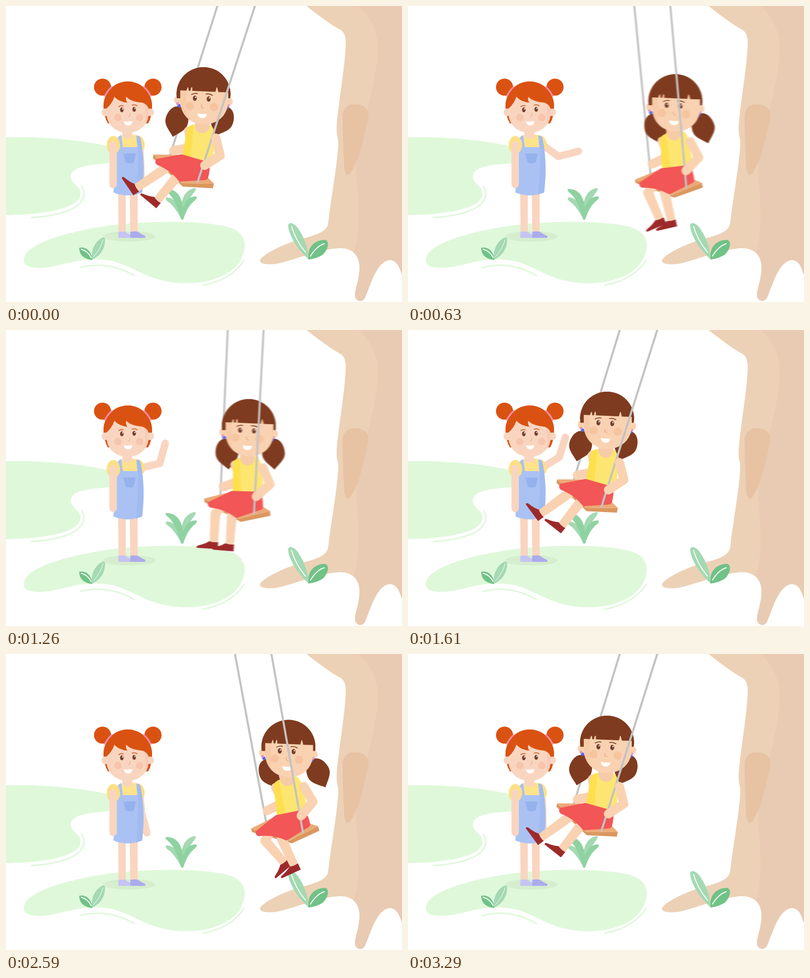
These frames come from a looping animation (800x600 px, 3.36 s). An HTML page:

```html
<!DOCTYPE html>
<html lang="en">
<head>
<meta charset="utf-8">
<title>Swing</title>
<style>
html, body { margin: 0; width: 100%; height: 100%; overflow: hidden; background: #fff; }
svg { display: block; width: 800px; height: 600px; }
.line { fill: none; stroke-linecap: round; stroke-linejoin: round; }
.grass { fill: #dff8da; }
.edge { stroke: #dff8da; stroke-width: 3; }
.vein { stroke: #fff; stroke-width: 1.9; }
.leaf { fill: #70c287; }
.pale { fill: #a4d9b2; }
.blade { fill: #8fd2a1; }
.skin { fill: #f9d5c0; }
.limb { stroke: #f9d5c0; stroke-width: 15; }
.tan { fill: #f9d2b2; }
.tanlimb { stroke: #f9d2b2; stroke-width: 18.5; }
.red { fill: #da5212; }
.brown { fill: #7f3b1f; }
.eye { fill: #753f30; }
.brow { stroke: #7f3b1f; stroke-width: 1.7; }
.rope { stroke: #c3c3c3; stroke-width: 4.2; }
</style>
</head>
<body>
<svg viewBox="0 0 800 600">
<defs>
  <filter id="blur" filterUnits="userSpaceOnUse" x="0" y="0" width="800" height="600" color-interpolation-filters="sRGB"><feGaussianBlur stdDeviation="0"/></filter>
  <filter id="soft" filterUnits="userSpaceOnUse" x="0" y="0" width="800" height="600" color-interpolation-filters="sRGB"><feGaussianBlur stdDeviation="0"/></filter>
  <path id="trunk" d="M607,0C630,18 655,37 675,48C686,54 687,68 686,85C684,130 668,220 668,250C668,270 672,262 671,285C668,330 655,400 651,440C648,460 620,466 590,474C560,483 515,505 513,516C513,524 530,525 550,522C590,512 640,492 672,491C700,490 712,505 714,525C716,550 704,575 705,588C708,600 720,601 725,592C735,570 748,517 775,515C790,515 795,530 800,545V0Z"/>
  <clipPath id="bark"><use href="#trunk"/></clipPath>
  <path id="tail" class="brown" d="M0,-1C17,-1 23,17 23,29C23,43 10,51 0,62C-10,51 -23,43 -23,29C-23,17 -17,-1 0,-1Z"/>
  <g id="leg">
    <path class="tan" d="M-10,0A10,10 0 0 1 10,0L8.5,62H-8Z"/>
    <path fill="#9d2a2b" d="M-9,57Q0,60 9,58V72H-33Q-36,69 -31,67Q-17,63 -9,57Z"/>
  </g>
</defs>

<!-- ground -->
<path class="grass" d="M0,266C70,264 160,272 210,285Q235,300 222,318C180,321 133,322 131,345C131,363 154,364 150,385C142,415 60,423 0,424Z"/>
<path class="grass" d="M36,513C40,480 130,455 225,443C320,433 420,437 455,450C485,462 485,485 480,500C470,540 420,562 365,562C290,562 265,530 215,517C150,505 110,530 70,531C45,531 34,525 36,513Z"/>
<g class="line edge">
  <path d="M153,366C164,385 153,405 122,416Q95,426 51,429"/>
  <path d="M151,530Q205,516 259,546"/>
  <path d="M398,566Q455,555 481,516"/>
</g>

<!-- tree -->
<use href="#trunk" fill="#ecd1b6"/>
<g clip-path="url(#bark)">
  <path fill="#e8cbb2" d="M712,0C740,25 752,55 751,90C750,130 738,180 730,210C712,270 707,300 708,340C712,400 717,460 702,500V600H800V0Z"/>
</g>
<path fill="#e7c3a3" d="M706,199C690,198 680,208 680,225C680,260 682,300 683,325C684,341 690,346 695,340C715,310 722,270 732,225C735,208 722,200 706,199Z"/>

<!-- plants -->
<path class="pale" d="M382,369C358,372 350,400 354,433C365,405 369,390 380,378Q385,371 382,369Z"/>
<path class="pale" d="M324,388C341,388 352,405 355,433C344,413 336,402 325,395Q321,390 324,388Z"/>
<path class="blade" d="M323,371C352,370 360,398 358,433H354C346,405 339,388 325,377Q321,373 323,371Z"/>
<path class="blade" d="M384,386C363,386 356,405 354,433H358C365,411 373,400 384,392Q387,387 384,386Z"/>
<path class="leaf" d="M173,515C155,512 148,503 148,490C161,487 174,497 174,515Z"/>
<path class="pale" d="M174,514C170,495 182,472 200,468C202,488 193,505 174,514Z"/>
<path class="pale" d="M611,513C590,495 571,465 570,445C571,437 580,439 588,448C600,465 610,485 611,513Z"/>
<path class="leaf" d="M611,514C608,490 622,474 645,474C655,478 650,495 640,504Q628,512 611,514Z"/>
<g class="line vein">
  <path d="M152,493Q166,497 172,510"/>
  <path d="M177,508Q191,493 196,474" stroke-width="1"/>
  <path d="M577,447Q585,475 605,499"/>
  <path d="M615,507Q628,486 643,482"/>
</g>

<!-- standing girl -->
<ellipse cx="249" cy="467" rx="53" ry="10.5" fill="#d6edce"/>
<path class="skin" d="M226.5,375H242V460H227.5ZM250,375H266V460H251Z"/>
<path fill="#c4c4f3" d="M227,458Q235,456 242,458Q247,463 257,466Q259,470 256,470H227Z"/>
<path fill="#ababec" d="M251,458Q259,456 266,457.5Q272,462 281,466Q283,470 280,470H251Z"/>
<path id="wave" class="line limb"/>
<ellipse cx="271" cy="277" rx="8.5" ry="15" fill="#fedf85" transform="rotate(-18 271 277)"/>
<path fill="#ffe28a" d="M228,264Q246,256 266,263L268,290H230Z"/>
<path class="skin" d="M235,253H255V261Q255,269 245,269Q235,269 235,261Z"/>
<path fill="#aac2f3" d="M225,268Q229,262 233,262L236,286H265L263,262Q270,263 272,270Q282,320 275,378Q246,390 217,378L222,310Z"/>
<path fill="#a1bbf0" d="M266,262.5Q271,264 272,270Q282,320 275,378L263,382Q267,330 267,290Z"/>
<path fill="#95b2ed" d="M237,299H262L259,314Q258,319 253,319H246Q242,319 241,315Z"/>
<ellipse cx="217" cy="282" rx="13.5" ry="18.5" fill="#fedf85"/>
<path class="line limb" d="M216.5,281V361.5"/>
<g>
  <circle class="red" cx="195" cy="164.5" r="17.3"/>
  <circle class="red" cx="297" cy="164.5" r="17.3"/>
  <path class="red" d="M197,203A49,50 0 0 1 295,203Q295,226 287,238H206Q198,226 197,203Z"/>
  <circle class="skin" cx="200.5" cy="215.5" r="7.7"/>
  <circle class="skin" cx="291.5" cy="215.5" r="7.7"/>
  <path class="skin" d="M203,195Q203,172 246,172Q288,172 288,195V217C288,240 270,257 246,257C221,257 203,240 203,217Z"/>
  <path fill="#f7cdb9" d="M281,195H288V217Q288,231 281,241Z"/>
  <path class="red" d="M197,208V203A49,50 0 0 1 295,203V208H288Q286,200 276,196Q252,194 243,184Q241,190 245,196Q228,194 219,184Q214,198 204,207Z"/>
  <path class="line" stroke="#f98ca6" stroke-width="3.4" d="M213,164.5Q205,172 200,182M279,164.5Q287,172 292,182"/>
  <g fill="#f6c5ae"><circle cx="226" cy="226" r="7.6"/><circle cx="270" cy="226" r="7.6"/></g>
  <ellipse class="eye" cx="234" cy="210.5" rx="3.6" ry="5"/>
  <ellipse class="eye" cx="259" cy="209.5" rx="3.6" ry="5"/>
  <g fill="#fff"><circle cx="235.5" cy="208.5" r="1.2"/><circle cx="260.5" cy="207.5" r="1.2"/></g>
  <path class="line" stroke="#c8521e" stroke-width="1.6" d="M228,204Q232,201 237,202.5M255,201Q261,199 265,202.5"/>
  <path class="line" stroke="#edb59b" stroke-width="1.4" d="M250,218Q252,224 247,224.5"/>
  <path fill="#fff" d="M238,233.5Q246,235.5 255,233Q255,242 247,242Q239,242 238,233.5Z"/>
</g>

<!-- swing -->
<g filter="url(#soft)"><g class="swing"><path class="line rope" d="M450,-73L331,304"/></g></g>
<g filter="url(#blur)"><g class="swing">
  <path fill="#db975f" d="M298,301L296.5,308L357,366L418,369.5L420,360L355,359Z"/>
  <path fill="#ebaa76" d="M298,301L363,302L420,360L355,359Z"/>
  <g class="torso">
    <g class="head">
      <use id="tailL" href="#tail"/>
      <use id="tailR" href="#tail"/>
    </g>
    <path class="line tanlimb" d="M369,253L376,286L339,293"/>
  </g>
  <path class="line tanlimb" d="M312,336L332,324M343,349L353,337"/>
  <use id="leg1" href="#leg"/>
  <use id="leg2" href="#leg"/>
  <g class="torso">
    <path fill="#fde571" d="M367,246Q374,240 383,240H411Q419,245 421,256L418,322L355,308Q361,280 364,258Z"/>
    <path fill="#fee04f" d="M367,246Q373,241 379,240.5L378,262L372,312L355,308Q361,280 364,258Z"/>
    <path fill="#f6cba8" d="M382,232H411V243Q410,258 396,258Q383,257 382,243Z"/>
  </g>
  <path fill="#f25656" d="M304,310L355,300.5L411,317Q413,332 408,349Q406,353 399,353L350,356Q333,333 305,322Q299,317 304,310Z"/>
  <g class="torso"><g class="head">
    <circle class="tan" cx="347.5" cy="190.5" r="8"/>
    <circle class="tan" cx="450" cy="194" r="8"/>
    <g fill="#5666e6"><circle cx="349.5" cy="202" r="3.4"/><circle cx="446.5" cy="206" r="3.4"/></g>
    <g fill="#e890c0"><circle cx="346.5" cy="198" r="2.8"/><circle cx="449" cy="202" r="2.8"/></g>
    <path class="brown" d="M344.5,178A54.5,54.5 0 0 1 453.5,179L453,187H345Z"/>
    <path class="tan" d="M352,165H449V191C449,221 428,240 400,240C372,240 352,220 352,191Z"/>
    <path fill="#f8cba8" d="M352,165H364V224Q352,211 352,191Z"/>
    <path class="brown" d="M344.5,178A54.5,54.5 0 0 1 453.5,179L453,187L449,186V175L429,174.5L426,163L423,174L376.5,172L376,158L372.5,172L369,171.5L368,162L364.5,171.5L352,171V186L345,185Z"/>
    <g fill="#f6c49f"><circle cx="371.5" cy="202.5" r="8.5"/><circle cx="420.5" cy="205" r="8.5"/></g>
    <ellipse class="eye" cx="381.5" cy="187" rx="4" ry="5.4"/>
    <ellipse class="eye" cx="409.5" cy="188.5" rx="4" ry="5.4"/>
    <g fill="#fff"><circle cx="383" cy="185" r="1.3"/><circle cx="411" cy="186.5" r="1.3"/></g>
    <path class="line brow" d="M375,179.5Q380,176 387,177.5M404,178.5Q411,177 417,181"/>
    <path class="line" stroke="#eba985" stroke-width="1.6" d="M395,200Q393,207 399,207"/>
    <path fill="#fff" d="M386.5,217.5Q396,220 405.5,218.5Q405,227.5 396,227.5Q387.5,227 386.5,217.5Z"/>
  </g></g>
</g></g>
<g filter="url(#soft)"><g class="swing"><path class="line rope" d="M526.6,-73L387,357"/></g></g>
<g filter="url(#blur)"><g class="swing"><g class="torso"><path class="line tanlimb" d="M424,268L432.5,303L401.5,323"/></g></g></g>
</svg>

<script>
const LOOP = 3360, SWING = 1680, FORTH = 875, STEP = 70;
const rad = Math.PI / 180;
const byId = id => document.getElementById(id);

// eased value at x from a list of [x, value] keys
function at(keys, x, ease = u => u) {
  if (x <= keys[0][0]) return keys[0][1];
  for (let i = 1; i < keys.length; i++) {
    const [a, p] = keys[i - 1], [b, q] = keys[i];
    if (x <= b) return p + (q - p) * ease((x - a) / (b - a));
  }
  return keys[keys.length - 1][1];
}
const smooth = u => (1 - Math.cos(Math.PI * u)) / 2;

const UPPER = [[210, 87], [350, 86], [840, 5], [910, 5], [1610, -32], [2170, -14], [2590, 85], [2730, 87]];
const FORE = [[210, 89], [350, 84], [840, -77], [910, -77], [1610, -73], [2170, -69], [2590, 75], [2730, 89]];
const LEG1 = [[0, 56], [.345, 18], [.592, -1], [1, -41]];
const LEG2 = [[0, 40], [.345, 13], [.592, 2], [1, -25]];

function turn(selector, angle, x, y) {
  document.querySelectorAll(selector).forEach(el =>
    el.setAttribute('transform', `rotate(${angle} ${x} ${y})`));
}
function hang(id, x, y, angle) {
  byId(id).setAttribute('transform', `translate(${x} ${y}) rotate(${angle})`);
}
function blur(id, size) {
  byId(id).firstElementChild.setAttribute('stdDeviation', `${size} 0`);
}

function pose(t) {
  const p = t % SWING;
  const u = p < FORTH ? p / FORTH : (SWING - p) / (SWING - FORTH);
  const s = smooth(u), speed = Math.sin(Math.PI * u);

  turn('.swing', -28.1 * s, 503, -68);
  turn('.torso', 11 * s, 388, 315);
  turn('.head', 17.1 * s, 398, 243);
  hang('leg1', 312, 336, at(LEG1, s) + 28.1 * s);
  hang('leg2', 343, 349, at(LEG2, s) + 28.1 * s);
  hang('tailL', 352, 205, 14 - 37 * s);
  hang('tailR', 447, 205, 22 - 48 * s);
  const size = speed > .35 ? 1.8 * speed : 0;
  blur('blur', size);
  blur('soft', size * .6);

  const a = at(UPPER, t, smooth) * rad, b = at(FORE, t, smooth) * rad;
  const ex = 270 + 42 * Math.cos(a), ey = 280 + 42 * Math.sin(a);
  byId('wave').setAttribute('d',
    `M270,280L${ex},${ey}L${ex + 42 * Math.cos(b)},${ey + 42 * Math.sin(b)}`);
}

const start = performance.now();
function tick() {
  const t = performance.now() - start + 8;
  pose(Math.floor(t / STEP) * STEP % LOOP);
  requestAnimationFrame(tick);
}
tick();
</script>
</body>
</html>
```
